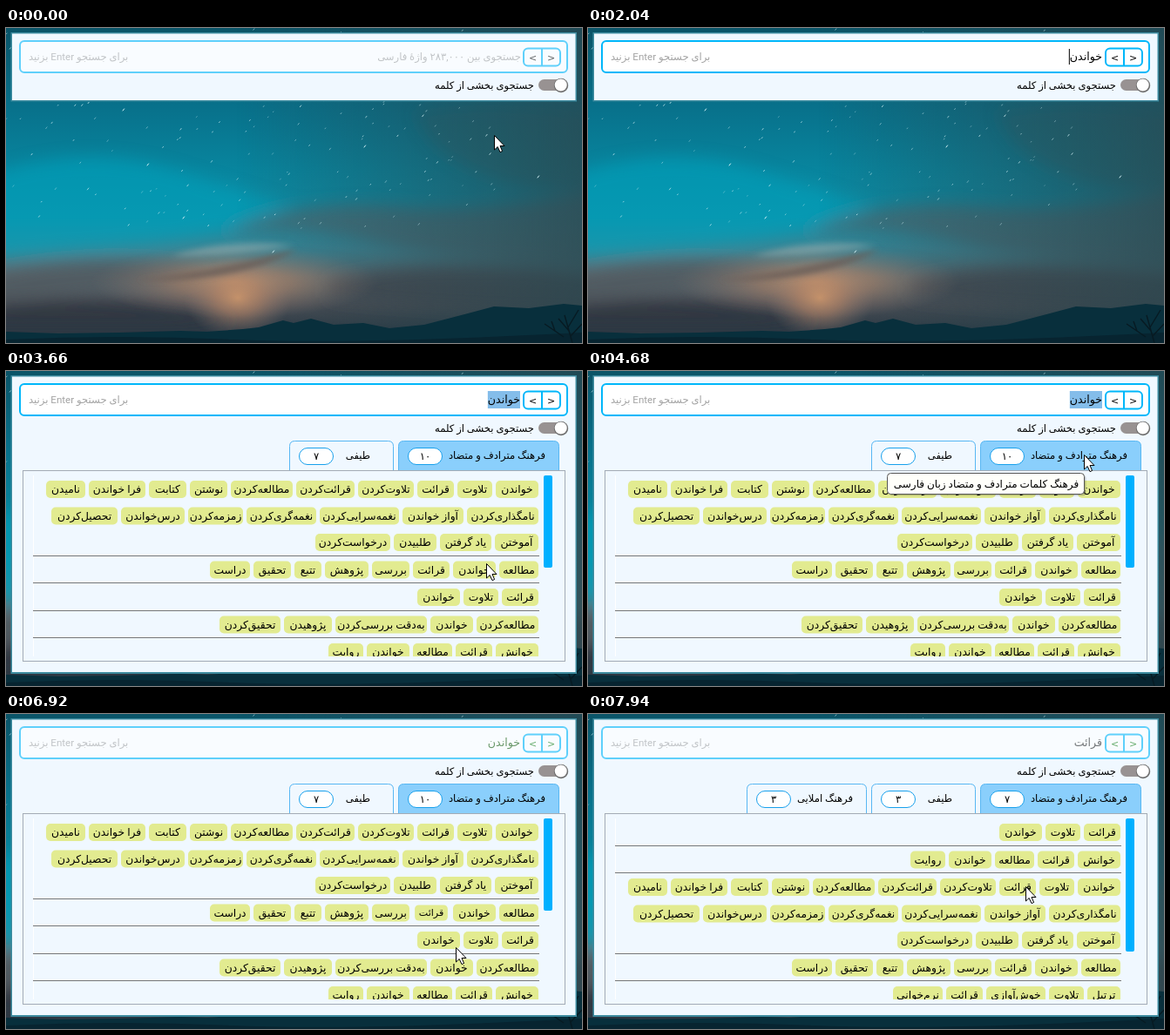
An HTML page that plays this animation: 661 px wide and 362 px high, repeating every 8000 ms.

```html
<!DOCTYPE html>
<html lang="fa">
<head>
<meta charset="utf-8">
<title>جستجوی واژه</title>
<style>
  html, body { margin: 0; width: 100%; height: 100%; overflow: hidden; background: #0a4b5c; }
  svg { display: block; width: 100vw; height: 100vh; }
  text { font-family: Roboto, "DejaVu Sans", sans-serif; font-size: 11.6px; direction: rtl; fill: #000; }
  .mid { text-anchor: middle; }
  .chip { font-size: 12.3px; }
  .ltr { direction: ltr; text-anchor: middle; font-family: "DejaVu Sans", sans-serif; font-size: 11px; }
  #typed { font-size: 12.6px; }
  .hint { fill: #a3a3a3; }
</style>
</head>
<body>
<svg id="stage" viewBox="0 0 661 362" preserveAspectRatio="none">
  <defs>
    <linearGradient id="sky" x2="0" y2="1">
      <stop offset="0" stop-color="#0a5468"/><stop offset=".24" stop-color="#08708a"/>
      <stop offset=".45" stop-color="#08859e"/><stop offset=".6" stop-color="#108ea6"/>
      <stop offset=".7" stop-color="#3b8696"/><stop offset=".79" stop-color="#5c6d74"/>
      <stop offset=".88" stop-color="#4c4e55"/><stop offset=".95" stop-color="#2f3b46"/>
    </linearGradient>
    <linearGradient id="shade">
      <stop offset=".4" stop-color="#29474f" stop-opacity="0"/><stop offset="1" stop-color="#29474f" stop-opacity=".75"/>
    </linearGradient>
    <radialGradient id="glow">
      <stop offset="0" stop-color="#d49a6c"/><stop offset=".4" stop-color="#b98869" stop-opacity=".7"/>
      <stop offset="1" stop-color="#8a7a74" stop-opacity="0"/>
    </radialGradient>
    <filter id="soft" x="-30%" y="-80%" width="160%" height="260%"><feGaussianBlur stdDeviation="9"/></filter>
    <filter id="fine" x="-30%" y="-80%" width="160%" height="260%"><feGaussianBlur stdDeviation="3"/></filter>
    <clipPath id="view"><rect x="28" y="120" width="600" height="208"/></clipPath>
  </defs>

  <rect width="661" height="362" fill="url(#sky)"/>
  <g filter="url(#soft)">
    <path d="M-20 170Q90 130 200 165T330 205Q260 240 140 250T-20 265Z" fill="#06a0bb" opacity=".6"/>
    <path d="M470 95Q560 80 680 100V185Q600 190 540 165T470 95Z" fill="#33606a" opacity=".4"/>
    <path d="M250 235Q330 195 450 205T680 185V275Q520 270 430 248T250 235Z" fill="#4c6a72" opacity=".75"/>
    <path d="M-20 285Q90 262 190 272T130 300T-20 312Z" fill="#50585f" opacity=".8"/>
    <path d="M370 290Q500 262 680 285V325Q520 325 370 310Z" fill="#45454e" opacity=".8"/>
    <path d="M-20 322Q80 305 200 322T200 345H-20Z" fill="#2b343f" opacity=".8"/>
  </g>
  <rect width="661" height="362" fill="url(#shade)"/>
  <ellipse cx="262" cy="292" rx="165" ry="42" fill="url(#glow)" opacity=".75"/>
  <ellipse cx="266" cy="310" rx="62" ry="48" fill="url(#glow)" opacity=".8"/>
  <g filter="url(#fine)">
    <path d="M190 262Q260 240 330 250Q270 262 190 262Z" fill="#9cb0b0" opacity=".5"/>
    <path d="M150 290Q230 282 335 254Q270 292 150 290Z" fill="#6a5d59" opacity=".85"/>
  </g>
  <g id="stars" stroke="#d5f3f7" stroke-linecap="round"/>
  <path d="M0 349L60 351L130 350L200 348L230 349L272 346L290 344L318 336L330 339L350 334L376 341L410 339L440 345L480 341L530 328L560 320L600 322L640 317L661 319V362H0Z" fill="#082f3c"/>
  <path d="M0 358Q130 352 260 358T661 350V362H0Z" fill="#072430"/>
  <path d="M650 362L641 330M646 348L634 334M645 344L657 324M640 355L618 340M648 354L661 340M630 348L626 337" fill="none" stroke="#071a22" stroke-width="1.4"/>

  <rect id="edge" x="5.5" y="5" width="649.5" fill="#3d8b9f"/>
  <rect id="panel" x="7" y="6.5" width="646.5" fill="#f0f8ff"/>

  <g id="field">
    <rect x="16" y="15" width="628" height="36" rx="5" fill="#fff" stroke="#00b7fa" stroke-width="2"/>
    <rect x="594" y="23.5" width="42" height="20" rx="5" fill="#fff" stroke="#00b7fa" stroke-width="2"/>
    <path d="M615 23.5V43.5" stroke="#00b7fa" stroke-width="2"/>
    <text class="ltr arrow" x="604.5" y="37.5">&lt;</text>
    <text class="ltr arrow" x="625.5" y="37.5">&gt;</text>
    <rect id="mark" y="23" height="20" fill="#84bdea"/>
    <text id="typed" x="590" y="37"/>
    <text id="hint" class="hint" x="591" y="37">جستجوی بین ۲۸۳,۰۰۰ واژهٔ فارسی</text>
    <text class="hint" x="26" y="37" text-anchor="end">برای جستجو Enter بزنید</text>
    <rect id="caret" y="24" width="1" height="18"/>
  </g>

  <rect x="611" y="59" width="32" height="13" rx="6.5" fill="#989292"/>
  <circle cx="637" cy="66" r="8.2" fill="#6f6f6f"/>
  <circle cx="636.7" cy="65.5" r="7" fill="#fff"/>
  <text x="606" y="70">جستجوی بخشی از کلمه</text>

  <g id="results">
    <g id="tabs"/>
    <rect x="19.5" y="114.5" width="622" height="219" fill="#f0f8ff" stroke="#a3abb5"/>
    <path d="M31.5 120V328" stroke="#fff"/>
    <g id="lists" clip-path="url(#view)"/>
    <rect id="bar" x="617" y="120" width="10" rx="2" fill="#00b0ff"/>
  </g>

  <g id="tip">
    <rect x="345.5" y="119.5" width="226" height="24" rx="4" opacity=".18"/>
    <rect x="343.5" y="117.5" width="226" height="24" rx="4" fill="#fffffa" stroke="#555"/>
    <text class="mid" x="457" y="134" style="font-size:12px">فرهنگ کلمات مترادف و متضاد زبان فارسی</text>
  </g>
  <path id="mouse" d="M-.5-.5V16L3.2 12.5L6 18.6L8.6 17.5L6 11.5H11Z" fill="#fff" stroke="#000"/>
  <path id="beam" d="M-3-8H-1Q0-8 0-7Q0-8 1-8H3M0-7V7M-3 8H-1Q0 8 0 7Q0 8 1 8H3" fill="none" stroke="#000"/>
</svg>
<script>
const $ = id => document.getElementById(id);
const LOOP = 8000;

function add(parent, tag, attrs, text) {
  const el = document.createElementNS("http://www.w3.org/2000/svg", tag);
  for (const k in attrs) el.setAttribute(k, attrs[k]);
  if (text) el.textContent = text.replace(/_/g, "\u200c");
  return parent.appendChild(el);
}
const show = (el, on) => el.setAttribute("display", on ? "inline" : "none");
const last = (keys, t) => keys.filter(k => k[0] <= t).pop();

// Stars: short slanted dashes scattered by a seeded generator
let seed = 11;
const rnd = () => (seed = seed * 16807 % 2147483647) / 2147483647;
function star(x, y, size, opacity) {
  add($("stars"), "path", { d: `M${x} ${y}l${size} ${-size * 1.3}`, opacity, "stroke-width": 1 });
}
for (let i = 0; i < 190; i++) star(rnd() * 560, 2 + rnd() * 230, .5 + rnd(), .3 + rnd() * .5);
[[610, 172], [162, 158], [411, 137], [134, 95], [203, 219], [306, 258]].forEach(([x, y]) => star(x, y, 1.6, 1));

// Chip widths by word; "_" stands for a zero-width non-joiner
const width = {
  "خواندن": 49, "تلاوت": 40, "قرائت": 42, "تلاوت_کردن": 64, "قرائت_کردن": 67, "مطالعه_کردن": 71,
  "نوشتن": 43, "کتابت": 43, "فرا خواندن": 65, "نامیدن": 45, "نامگذاری_کردن": 82, "آواز خواندن": 70,
  "نغمه_سرایی_کردن": 91, "نغمه_گری_کردن": 80, "زمزمه_کردن": 63, "درس_خواندن": 73, "تحصیل_کردن": 76,
  "آموختن": 50, "یاد گرفتن": 59, "طلبیدن": 49, "درخواست_کردن": 86, "مطالعه": 45, "بررسی": 43,
  "پژوهش": 50, "تتبع": 31, "تحقیق": 43, "دراست": 46, "به_دقت بررسی_کردن": 105, "پژوهیدن": 55,
  "تحقیق_کردن": 70, "خوانش": 49, "روایت": 40, "ترتیل": 38, "خوش_آوازی": 68, "نرم_خوانی": 57
};
const naming = [
  "خواندن/تلاوت/قرائت/تلاوت_کردن/قرائت_کردن/مطالعه_کردن/نوشتن/کتابت/فرا خواندن/نامیدن",
  "نامگذاری_کردن/آواز خواندن/نغمه_سرایی_کردن/نغمه_گری_کردن/زمزمه_کردن/درس_خواندن/تحصیل_کردن",
  "آموختن/یاد گرفتن/طلبیدن/درخواست_کردن"
];
const study = ["مطالعه/خواندن/قرائت/بررسی/پژوهش/تتبع/تحقیق/دراست"];
const recite = ["قرائت/تلاوت/خواندن"];
const reading = ["خوانش/قرائت/مطالعه/خواندن/روایت"];
const survey = ["مطالعه_کردن/خواندن/به_دقت بررسی_کردن/پژوهیدن/تحقیق_کردن"];
const chant = ["ترتیل/تلاوت/خوش_آوازی/قرائت/نرم_خوانی"];

function chip(parent, word, right, cy) {
  const w = width[word], g = add(parent, "g", { transform: `translate(${right - w / 2} ${cy})` });
  const body = add(g, "g", {});
  add(body, "rect", { x: -w / 2, y: -10, width: w, height: 20, rx: 5, fill: "#e2eb90" });
  add(body, "text", { class: "mid chip", y: 4 }, word);
  return body;
}
function list(groups) {
  const g = add($("lists"), "g", {}), chips = [];
  let cy = 136;
  groups.forEach(rows => {
    rows.forEach((row, i) => {
      if (i) cy += 30.5;
      let right = 611;
      for (const word of row.split("/")) {
        chips.push(chip(g, word, right, cy));
        right -= width[word] + 4;
      }
    });
    add(g, "rect", { x: 31, y: Math.floor(cy + 15), width: 581, height: 1, fill: "#777" });
    cy += 31.5;
  });
  return { g, chips };
}
const first = list([naming, study, recite, survey, reading]);
const second = list([recite, reading, naming, study, chant]);
const pressed = first.chips[23];

function tab(left, right, label, textRight, active) {
  const g = add($("tabs"), "g", {});
  add(g, "path", {
    d: `M${left + .5} 115V86.5q0-6 6-6H${right - 6.5}q6 0 6 6V115`,
    fill: active ? "#8acffc" : "#f0f8ff", stroke: "#58b7f3"
  });
  add(g, "text", { x: textRight, y: 101 }, label);
  add(g, "rect", { x: left + 11.5, y: 88.5, width: 39, height: 19, rx: 9.5, fill: "#fff", stroke: "#18a0ec" });
  const count = add(g, "text", { class: "mid", x: left + 31, y: 102 });
  return { g, count };
}
const tabs = [
  tab(450, 635, "فرهنگ مترادف و متضاد", 619, true),
  tab(325, 445, "طیفی", 418),
  tab(182, 320, "فرهنگ املایی", 304)
];
const counts = [["۱۰", "۷", ""], ["۷", "۳", "۳"]];

const typing = [[0, ""], [1220, "خ"], [1420, "خوا"], [1620, "خوان"], [1820, "خواند"], [2040, "خواندن"], [7340, "قرائت"]];
const fade = [[0, .6], [600, .8], [820, 1], [6520, .8], [6720, .6]];
const path = [
  [0, 561, 124], [200, 566, 106], [400, 566, 72], [600, 556, 34],
  [3260, 511, 284], [3460, 525, 262], [3660, 552, 222], [3880, 580, 172], [4080, 597, 132], [4280, 590, 108],
  [4480, 579, 96], [4680, 570, 97], [5100, 566, 118], [5300, 548, 170], [5500, 530, 213],
  [5700, 521, 232], [5900, 516, 244], [6100, 508, 240], [6320, 498, 229], [6720, 508, 250],
  [6920, 517, 269], [7340, 516, 260], [7540, 512, 240], [7740, 506, 214], [7940, 503, 199]
];

function draw(t) {
  const open = t >= 2440, next = t >= 7340, blurred = t >= 6520;
  const text = last(typing, t)[1];

  $("edge").setAttribute("height", open ? 343 : 79.5);
  $("panel").setAttribute("height", open ? 339.5 : 76.5);
  $("field").setAttribute("opacity", last(fade, t)[1]);
  $("typed").textContent = text;
  $("typed").style.fill = next ? "#222" : blurred ? "#125a08" : "#000";
  document.querySelectorAll(".arrow").forEach(a => a.style.fill = blurred ? "#0a7a0a" : "#000");
  show($("hint"), !text);

  const w = text ? $("typed").getComputedTextLength() : 0;
  $("mark").setAttribute("x", 590 - w);
  $("mark").setAttribute("width", w);
  show($("mark"), open && !blurred);
  $("caret").setAttribute("x", 589 - w);
  show($("caret"), t >= 820 && !open);

  show($("results"), open);
  show(first.g, !next);
  show(second.g, next);
  show(tabs[2].g, next);
  tabs.forEach((b, i) => b.count.textContent = counts[+next][i]);
  $("bar").setAttribute("height", next ? 153 : 106);
  pressed.setAttribute("transform", t >= 6720 ? "scale(.9)" : "");
  show($("tip"), t >= 4680 && t < 5100);

  const [, x, y] = last(path, t);
  show($("mouse"), t < 600 || t >= 3260);
  show($("beam"), t >= 600 && t < 1220);
  $("mouse").setAttribute("transform", `translate(${x} ${y})`);
  $("beam").setAttribute("transform", `translate(${x} ${y})`);
}

const start = performance.now();
function tick(now) {
  draw(Math.max(0, now - start) % LOOP);
  requestAnimationFrame(tick);
}
draw(0);
requestAnimationFrame(tick);
</script>
</body>
</html>
```
